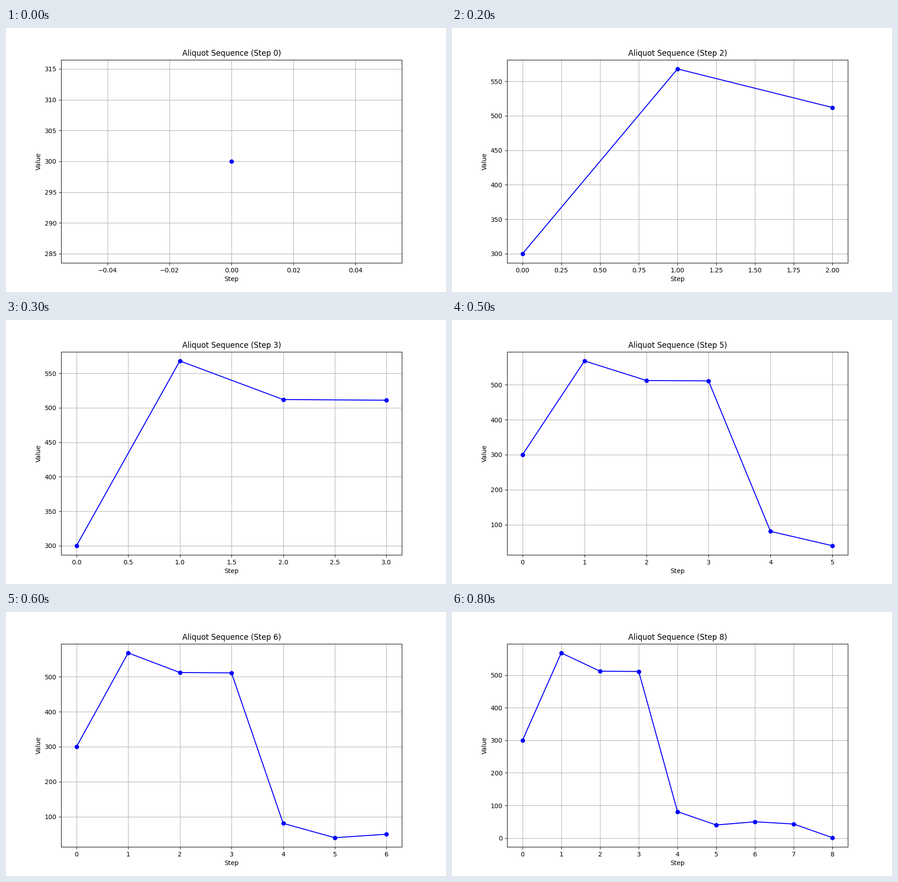
A matplotlib script for the animation above (0.9 s loop, 966x580 px).

```python
import matplotlib.pyplot as plt
from matplotlib.animation import FuncAnimation

WIDTH, HEIGHT, DPI = 966, 580, 100
START = 300
INTERVAL = 100  # ms per step


def aliquot_sum(n):
    return sum(d for d in range(1, n // 2 + 1) if n % d == 0)


def aliquot_sequence(n):
    values = [n]
    while values[-1] > 1:
        values.append(aliquot_sum(values[-1]))
    return values


values = aliquot_sequence(START)

plt.rcParams["font.family"] = "DejaVu Sans"
fig, ax = plt.subplots(figsize=(WIDTH / DPI, HEIGHT / DPI), dpi=DPI)


def draw(step):
    # The axes rescale to the points shown so far.
    ax.clear()
    ax.plot(range(step + 1), values[:step + 1], marker="o", color="blue")
    ax.set_title(f"Aliquot Sequence (Step {step})")
    ax.set_xlabel("Step")
    ax.set_ylabel("Value")
    ax.grid(True)
    return ax.lines


anim = FuncAnimation(fig, draw, frames=len(values), interval=INTERVAL,
                     init_func=lambda: draw(0), repeat=True, repeat_delay=0)
plt.show()
```
